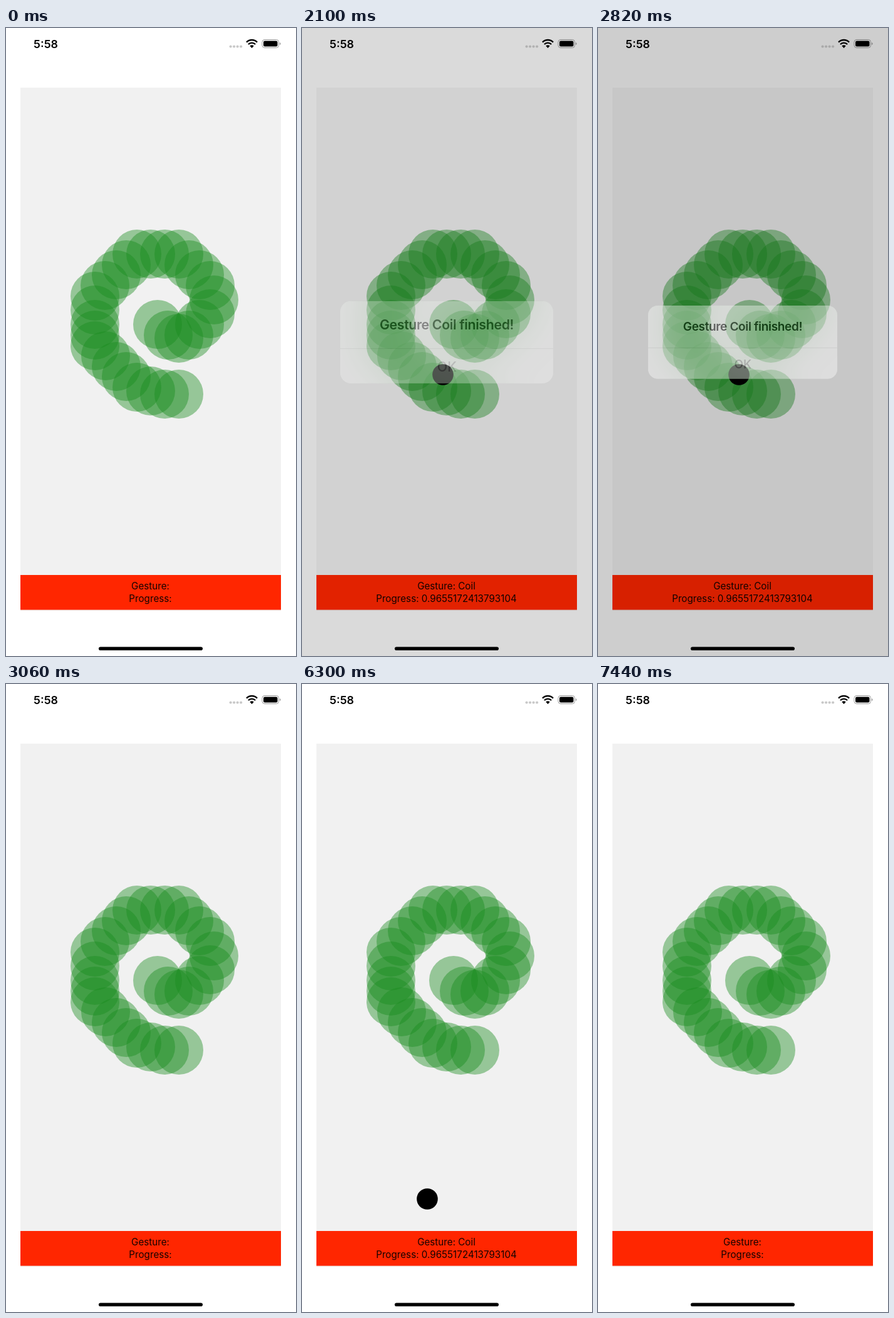
These frames come from a looping animation (463 by 1000 pixels, 8.1 s). An HTML page:

```html
<!DOCTYPE html>
<html lang="en">
<head>
<meta charset="utf-8">
<title>Coil gesture</title>
<style>
  html, body { margin: 0; width: 100%; height: 100%; overflow: hidden; background: #fff; }
  svg { display: block; width: 100%; height: 100%; }
  text { font-family: Inter, Roboto, sans-serif; text-anchor: middle; }
  .label { font-size: 15.2px; fill: #160300; }
  .title { font-size: 19px; font-weight: 600; letter-spacing: -.35px; }
</style>
</head>
<body>
<svg viewBox="0 0 463 1000" preserveAspectRatio="none">
  <defs>
    <clipPath id="alertShape"><rect x="80" y="442" width="302" height="116.5" rx="15.5"/></clipPath>
    <filter id="frost" filterUnits="userSpaceOnUse" x="0" y="240" width="463" height="460">
      <feGaussianBlur stdDeviation="20"/>
    </filter>
  </defs>

  <rect id="page" width="463" height="1000"/>
  <rect id="panel" x="23" y="95" width="416" height="833"/>
  <g id="coil" fill="#1a8a1e" fill-opacity=".42"></g>
  <circle id="dot" r="16.8"/>

  <rect x="23" y="871" width="416" height="55.5" fill="#ff2600"/>
  <text id="gesture" class="label" x="230.5" y="894"></text>
  <text id="progress" class="label" x="230.5" y="913.5"></text>

  <text x="63.5" y="32" font-size="17.8" font-weight="600">5:58</text>
  <g fill="#c9c9c9">
    <circle cx="358.6" cy="29.5" r="2.1"/><circle cx="364.1" cy="29.5" r="2.1"/>
    <circle cx="369.6" cy="29.5" r="2.1"/><circle cx="375.1" cy="29.5" r="2.1"/>
  </g>
  <path d="M392.5 32L389.3 28.6A4.6 4.6 0 0 1 395.7 28.6Z"/>
  <path d="M386.9 26A7.9 7.9 0 0 1 398.1 26M384 22.6A12 12 0 0 1 401 22.6"
        fill="none" stroke="#000" stroke-width="2.4"/>
  <rect x="409" y="18.5" width="26.5" height="13" rx="4" fill="none" stroke="#999"/>
  <rect x="411" y="20.4" width="22.5" height="9.2" rx="2.3"/>
  <path d="M437 23v4q1.6-.5 1.6-2t-1.6-2" fill="#999"/>

  <rect id="dim" width="463" height="1000"/>
  <g id="alert">
    <g clip-path="url(#alertShape)">
      <rect x="80" y="442" width="302" height="117" fill="#f1f1f1"/>
      <use href="#coil" filter="url(#frost)"/>
      <rect x="80" y="442" width="302" height="117" fill="#f4f4f4" fill-opacity=".77"/>
      <path d="M80 509.3H382" stroke="#000" stroke-opacity=".13"/>
    </g>
    <text class="title" x="231" y="482">Gesture Coil finished!</text>
    <text x="231.3" y="541.5" font-size="19" font-weight="500" fill="#8f938f">OK</text>
  </g>
  <rect x="148" y="985.5" width="166" height="5.6" rx="2.8"/>
</svg>

<script>
const LOOP = 8100, STEP = 60, TOTAL = 29;
const $ = id => document.getElementById(id);
const set = (id, attrs) => {
  for (const key in attrs) $(id).setAttribute(key, attrs[key]);
};
const clamp = v => Math.max(0, Math.min(1, v));
const gray = v => `rgb(${v},${v},${v})`;

const centers = [
  [242, 472], [259, 489], [276, 494], [292, 489], [309, 472], [326, 455],
  [332, 433], [326, 410], [309, 393], [292, 377], [276, 360], [253, 360],
  [231, 360], [209, 360], [192, 377], [176, 393], [158, 410], [142, 427],
  [142, 449], [142, 472], [142, 489], [142, 506], [159, 522], [176, 539],
  [192, 555], [209, 572], [231, 578], [253, 583], [276, 583]
];
$('coil').innerHTML = centers.map(([x, y]) => `<circle cx="${x}" cy="${y}" r="39"/>`).join('');

// time, x, y, matched points
const stroke = [
  [0, 250, 467, 0], [180, 268, 495, 3], [360, 312, 488, 6], [540, 346, 446, 8],
  [660, 351, 402, 9.3], [780, 337, 353, 11], [960, 290, 332, 13], [1140, 248, 329, 15],
  [1290, 208, 340, 16.5], [1440, 172, 367, 18.2], [1620, 134, 412, 21],
  [1740, 124, 460, 23.5], [1820, 140, 510, 25.5], [1880, 178, 540, 27], [1950, 225, 552, 28.2]
];
const STROKE_TIME = 1950;

const runs = [
  { start: 60, draw: 1950, alert: 2040, dismiss: 2640, clear: 3000, dx: 0, dy: 0 },
  { start: 5160, draw: 1140, alert: 6330, dismiss: 7020, clear: 7380, dx: -25, dy: 268 }
];

const spline = (a, b, c, d, u) =>
  b + .5 * u * (c - a + u * (2 * a - 5 * b + 4 * c - d + u * (3 * (b - c) + d - a)));

function strokeAt(time) {
  const last = stroke.length - 1;
  let i = 0;
  while (i < last - 1 && stroke[i + 1][0] <= time) i++;
  const p = stroke[i], q = stroke[i + 1];
  const before = stroke[Math.max(0, i - 1)], after = stroke[Math.min(last, i + 2)];
  const u = clamp((time - p[0]) / (q[0] - p[0]));
  const axis = k => spline(before[k], p[k], q[k], after[k], u);
  return { x: axis(1), y: axis(2), matched: Math.floor(p[3] + (q[3] - p[3]) * u) };
}

function render(t) {
  const run = runs.find(r => t >= r.start && t < r.clear);
  let matched = 0, shown = 0, scale = 1;
  if (run) {
    const point = strokeAt((t - run.start) / run.draw * STROKE_TIME);
    matched = point.matched;
    set('dot', { cx: point.x + run.dx, cy: point.y + run.dy });
    const arrive = 1 - (1 - clamp((t - run.alert) / 420)) ** 3;
    const leave = clamp((t - run.dismiss) / (run.clear - run.dismiss));
    shown = arrive * (1 - leave * leave * (3 - 2 * leave));
    scale = 1.2 - .2 * arrive;
  }
  set('dot', { visibility: run ? 'visible' : 'hidden' });
  $('gesture').textContent = matched > 1 ? 'Gesture: Coil' : 'Gesture:';
  $('progress').textContent = matched > 1 ? `Progress: ${matched / TOTAL}` : 'Progress:';
  set('page', { fill: gray(255 - 23 * shown) });
  set('panel', { fill: gray(241 - 11 * shown) });
  set('dim', { opacity: .31 * shown });
  set('alert', {
    opacity: shown,
    display: shown > 0 ? 'inline' : 'none',
    transform: `translate(231 500) scale(${scale}) translate(-231 -500)`
  });
}

const origin = performance.now();
function tick() {
  const t = (performance.now() - origin) % LOOP;
  render(Math.floor(t / STEP) * STEP);
  requestAnimationFrame(tick);
}
tick();
</script>
</body>
</html>
```
